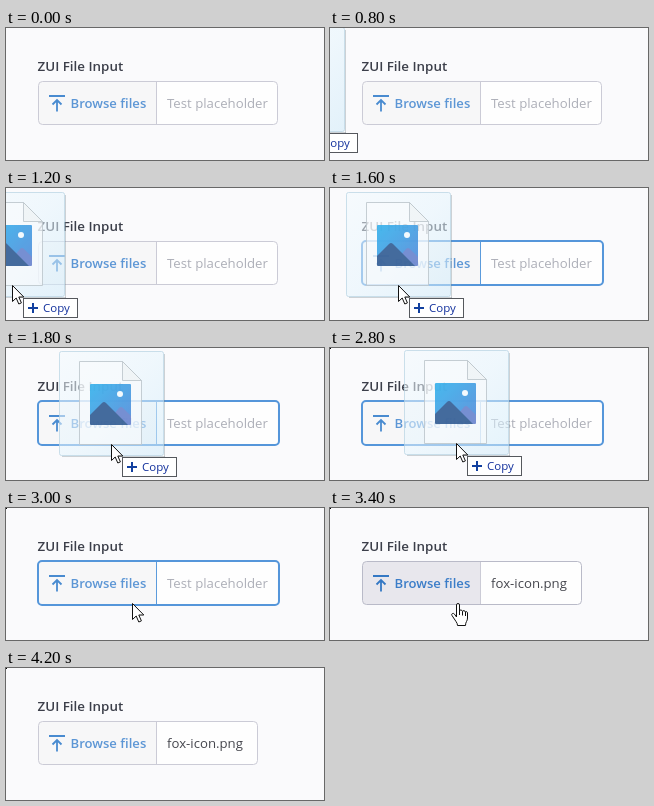
Write an HTML page that moves like this. It is 318x132 px and loops after 5000 ms.

```html
<!DOCTYPE html>
<html lang="en">
<head>
<meta charset="utf-8">
<title>File input</title>
<style>
  html, body { margin: 0; width: 100%; height: 100%; overflow: hidden; background: #fafafc; }
  svg { display: block; width: 318px; height: 132px; }
  text { font-family: "Open Sans", "Noto Sans", sans-serif; white-space: pre; }
  .bold { font-weight: 600; }
</style>
</head>
<body>
<svg viewBox="0 0 318 132" xmlns="http://www.w3.org/2000/svg">
  <defs>
    <linearGradient id="glass" x1="0" y1="0" x2="1" y2="1">
      <stop offset="0" stop-color="#f3fafe"/>
      <stop offset=".5" stop-color="#e6f5fd"/>
      <stop offset="1" stop-color="#cfeaf9"/>
    </linearGradient>
    <linearGradient id="sky" x1="0" y1="0" x2="1" y2="1">
      <stop offset="0" stop-color="#2fb0ec"/>
      <stop offset="1" stop-color="#4f86d8"/>
    </linearGradient>
    <clipPath id="photo"><rect x="31" y="33" width="41" height="41" rx="1"/></clipPath>
  </defs>

  <rect width="318" height="132" fill="#fafafc"/>
  <text class="bold" x="31.500" y="43" font-size="13.400" fill="#3c3f4a">ZUI File Input</text>

  <rect id="field" x="32.5" y="53.5" height="43" rx="3.5" fill="#fefefe"/>
  <path id="button" d="M150 54H36q-3 0-3 3v36q0 3 3 3h114z"/>
  <path id="divider" d="M150.5 54v42"/>
  <rect id="frame" rx="4" fill="none"/>
  <g id="icon" fill="none" stroke-width="1.8">
    <path d="M43 68h16M51 83.500V72.500M46.500 76.500l4.500-4.500 4.500 4.500"/>
  </g>
  <text id="browse" class="bold" x="64.500" y="80" font-size="13.100">Browse files</text>
  <text id="value" x="161" y="80" font-size="13.200"></text>

  <g id="ghost">
    <path d="M105.500 3v103M3 105.500h103" stroke="#75838c" stroke-opacity=".35"/>
    <rect x=".5" y=".5" width="104" height="104" rx="2" fill="url(#glass)" fill-opacity=".55" stroke="#b7d3e3" stroke-opacity=".7"/>
    <path d="M20.500 10.500h43l19 19v64h-62z" fill="#fafcfd" fill-opacity=".6" stroke="#bcc6cc" stroke-opacity=".85"/>
    <path d="M63.500 10.500v19h19z" fill="#eef2f4" fill-opacity=".7" stroke="#bcc6cc" stroke-opacity=".85"/>
    <g clip-path="url(#photo)" opacity=".88">
      <rect x="31" y="33" width="41" height="41" fill="url(#sky)"/>
      <circle cx="61" cy="43" r="3" fill="#f4fafd"/>
      <path d="M46 74 60 57q2-2 4 0l10 10v9z" fill="#6580cc"/>
      <path d="M29 66 43 52q2-2 4 0l24 24H29z" fill="#2c5790"/>
    </g>
  </g>

  <g id="tag">
    <rect x=".5" y=".5" width="54" height="19" fill="#fff" stroke="#55585d"/>
    <path d="M5 10h10M10 5v10" stroke="#12409f" stroke-width="2"/>
    <text x="20" y="14" font-size="11.5" fill="#12309c">Copy</text>
  </g>
  <path id="arrow" d="M.5.5v16l3.700-3.500 2.600 6 2.600-1.100-2.600-5.900h5z" fill="#fff" stroke="#111" stroke-linejoin="round"/>
  <g id="hand" transform="translate(121 95)">
    <path d="M5.500 14V2q0-1.500 1.500-1.500T8.500 2v6q0-1 1.300-1t1.700 1.500q.3-1 1.500-.8t1.500 1.300q.5-.7 1.300-.3.700.4.700 1.300v5q0 2-1 3.500t-1 4H6.500q0-2-1.500-4L1 12.500q-.8-1.500.4-2 1.100-.5 2.100.7z" fill="#fff" stroke="#111" stroke-linejoin="round"/>
    <path d="M8.500 8v4M11.500 8.500v4M14.500 9v4" stroke="#111"/>
  </g>
  <rect id="dot" width="1" height="1" fill="#000"/>
</svg>
<script>
  const LOOP = 5000;
  const STEP = 200;
  const $ = id => document.getElementById(id);
  const set = (id, attrs) => {
    for (const [key, value] of Object.entries(attrs)) $(id).setAttribute(key, value);
  };
  const show = (id, on) => set(id, { visibility: on ? "visible" : "hidden" });
  const move = (id, x, y) => set(id, { transform: `translate(${x} ${y})` });

  // Pointer position: time, x, y; each holds until the next.
  const path = [
    [800, -38, 92], [1000, -17, 97], [1200, 6, 97], [1400, 40, 97],
    [1600, 68, 97], [1800, 105, 96], [2000, 111, 95], [2200, 113, 95], [2400, 126, 95]
  ];

  function draw(time) {
    const t = Math.floor((time % LOOP) / STEP) * STEP;
    const within = (from, to) => t >= from && t < to;
    const dragging = within(800, 3000);
    const focused = within(1400, 3200);
    const hovered = within(3200, 3600);
    const filled = t >= 3200;
    const width = filled ? 219 : 239;

    set("field", { width });
    set("button", { fill: hovered ? "#e8e7ed" : "#f7f7f8" });
    set("divider", { stroke: focused ? "#5b9bdc" : "#cbcbd6" });
    set("frame", focused
      ? { x: 32, y: 53, width: 241, height: 44, stroke: "#5596da", "stroke-width": 2 }
      : { x: 32.5, y: 53.5, width, height: 43, stroke: hovered ? "#b9bac8" : "#cbcbd6", "stroke-width": 1 });
    set("icon", { stroke: hovered ? "#3478c4" : "#498bd0" });
    set("browse", { fill: hovered ? "#3b7dc8" : "#5c96d5" });
    set("value", { fill: filled ? "#45464d" : "#adafb8" });
    $("value").textContent = filled ? "fox-icon.png" : "Test placeholder";

    const [, x, y] = path.filter(p => p[0] <= t).pop() || path[0];
    move("ghost", x - 52, y - 93);
    move("tag", x + 11, y + 13);
    move("arrow", x, y);
    show("ghost", dragging);
    show("tag", dragging);
    show("arrow", within(800, 3200));
    show("hand", hovered);
    show("dot", within(200, 800) || t >= 2800);
  }

  const start = performance.now();
  function tick() {
    draw(performance.now() - start);
    requestAnimationFrame(tick);
  }
  draw(0);
  requestAnimationFrame(tick);
</script>
</body>
</html>
```
